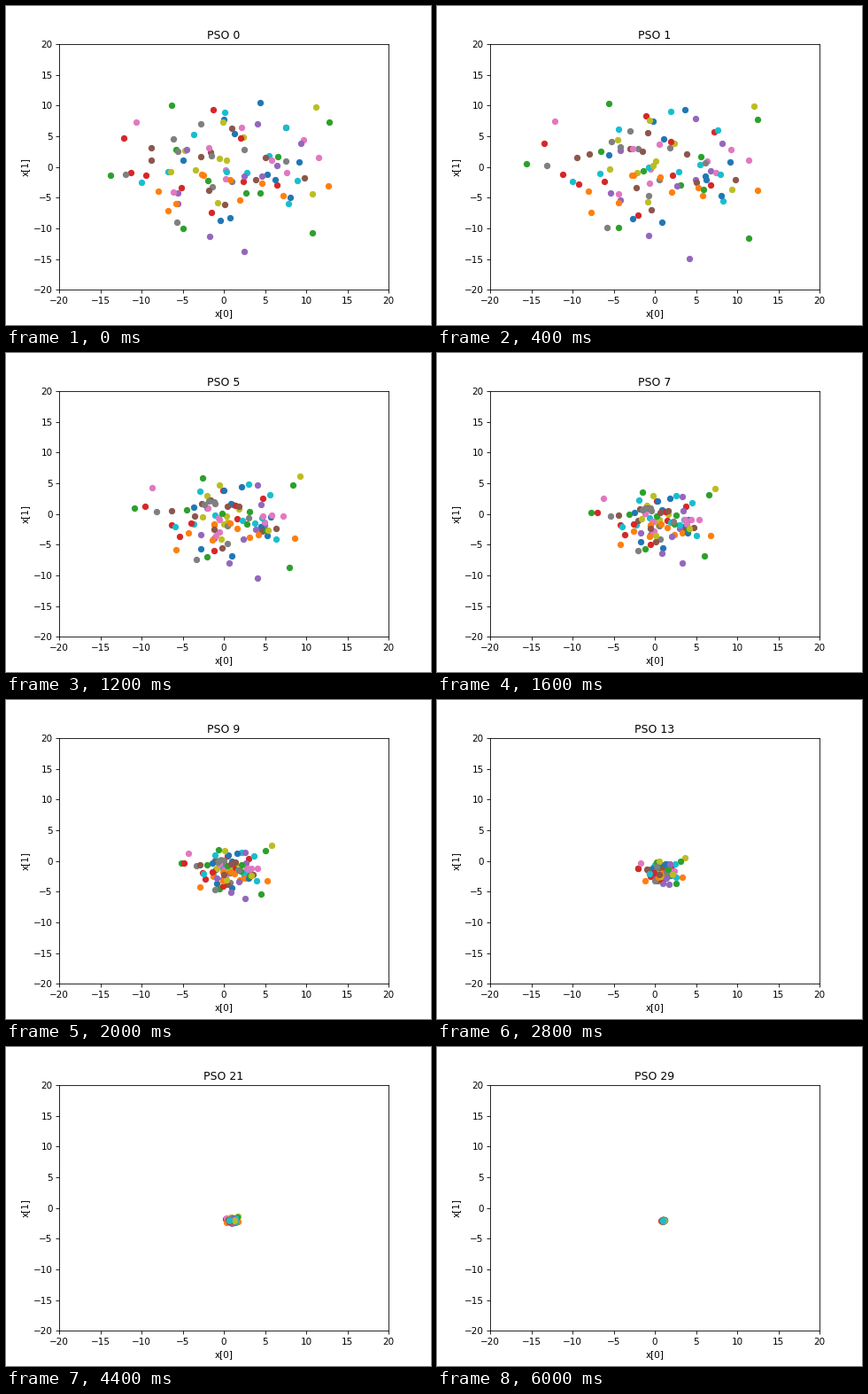
These frames come from a looping animation (480x360 px, 6200 ms). A matplotlib script:

```python
import numpy as np
import matplotlib.pyplot as plt
from matplotlib.animation import FuncAnimation

COUNT, TICKS, INTERVAL = 100, 31, 200
BEST = np.array([1.0, -2.05])   # where the swarm converges
SPREAD = 6.2                    # width of the initial cloud
BEND = 3                        # step at which the waypoint is reached

# The farthest particles: start and waypoint, keyed by particle index.
SCOUTS = {
    1: ((12.7, -3), (10.7, -4.1)),
    2: ((-13.8, -1.3), (-14.2, 1.4)),
    3: ((-12.2, 4.7), (-12.3, 2.4)),
    4: ((2.5, -13.8), (4.8, -13.3)),
    6: ((-10.6, 7.3), (-11.2, 6.1)),
    8: ((11.2, 9.8), (11.2, 8.3)),
    12: ((12.8, 7.4), (10.6, 6.6)),
    22: ((10.8, -10.7), (10.1, -10.6)),
}

rng = np.random.default_rng(7)

# Truncated normal cloud around the origin.
radius = SPREAD * np.sqrt(-2 * np.log(rng.uniform(0.15, 1, COUNT)))
angle = rng.uniform(0, 2 * np.pi, COUNT)
start = np.column_stack([radius * np.cos(angle), radius * np.sin(angle)])
waypoint = BEST + 0.82 * (start - BEST) + rng.normal(0, 1.3, (COUNT, 2))
for i, (a, b) in SCOUTS.items():
    start[i], waypoint[i] = a, b

# Each particle is a damped pull to BEST: a slow and a fast decay
# whose shares make it pass through its waypoint.
slow = rng.uniform(0.79, 0.86, (COUNT, 1))
fast = 0.61
slow_part = ((waypoint - BEST) - fast ** BEND * (start - BEST)) / (
    slow ** BEND - fast ** BEND)
fast_part = start - BEST - slow_part


def positions(step):
    return BEST + slow_part * slow ** step + fast_part * fast ** step


fig, ax = plt.subplots(figsize=(6.4, 4.8), dpi=75)
x, y = start.T
dots = ax.plot(x[None], y[None], "o")   # one line, and colour, per particle
ax.set(xlim=(-20, 20), ylim=(-20, 20), xlabel="x[0]", ylabel="x[1]")
title = ax.set_title("PSO 0")


def draw(tick):
    step = max(0, tick - 1)     # the start is held for two ticks
    for dot, (px, py) in zip(dots, positions(step)):
        dot.set_data([px], [py])
    title.set_text(f"PSO {step}")
    return [*dots, title]


anim = FuncAnimation(fig, draw, frames=TICKS, interval=INTERVAL,
                     repeat=True, repeat_delay=0, blit=False)
plt.show()
```
